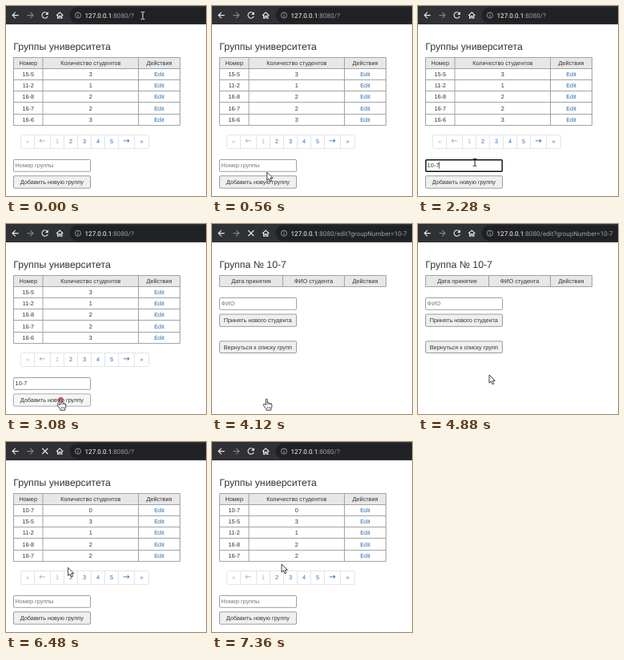
An HTML page for the animation above (7.4 s loop, 250 by 238 pixels).

```html
<!DOCTYPE html>
<html lang="ru">
<head>
<meta charset="utf-8">
<title>Группы университета</title>
<style>
  html, body { margin: 0; width: 100%; height: 100%; overflow: hidden; background: #fff; }
  svg { display: block; width: 250px; height: 238px; }
  text { font: 7.3px "Liberation Sans", Arial, sans-serif; fill: #333; text-rendering: geometricPrecision; }
  text.title { font-size: 12.3px; }
  text.url { font: 8.15px Roboto, sans-serif; fill: #9aa0a6; }
  .host { fill: #fff; }
  .mid { text-anchor: middle; }
  text.link { fill: #2f6cab; }
  text.off { fill: #aaa; }
  text.wide { font: 10px "DejaVu Sans", sans-serif; }
  text.hint { fill: #757575; }
  .icon { fill: none; stroke: #e8eaed; stroke-width: 1.1; }
  .dim { stroke: #808286; }
</style>
</head>
<body>
<svg viewBox="0 0 250 238">
  <rect width="250" height="238" fill="#fff"/>
  <g id="pages"></g>
  <rect id="focus" x="9.8" y="192.8" width="95.4" height="14.4" rx="1" fill="none" stroke="#111" stroke-width="1.4"/>
  <text id="value" x="11.6" y="202"></text>
  <rect id="caret" y="195.2" width=".7" height="8.5" fill="#111"/>

  <rect width="250" height="23" fill="#303134"/>
  <rect x="79.5" y="1.5" width="190" height="20" rx="10" fill="#202124"/>
  <path class="icon" d="M15.6 11.6H8M11.8 7.8L8 11.6L11.8 15.4"/>
  <path class="icon dim" d="M26.4 11.6H34M30.2 7.8L34 11.6L30.2 15.4"/>
  <g id="reload">
    <path class="icon" d="M51.6 9.2A3.7 3.7 0 1 0 52.2 12.7"/>
    <path d="M52.8 7.2V11H49Z" fill="#e8eaed"/>
  </g>
  <path id="stop" class="icon" d="M45.3 8L52.3 15M52.3 8L45.3 15"/>
  <path class="icon" d="M63 11.8L67.2 8L71.4 11.8M64.5 10.8V15.2H66.2V12.6H68.2V15.2H69.9V10.8"/>
  <circle cx="90" cy="11.6" r="3.6" fill="none" stroke="#9aa0a6" stroke-width=".9"/>
  <path d="M90 11V13.8M90 9.2V10.1" stroke="#9aa0a6"/>
  <text class="url" x="98.5" y="14.5"><tspan class="host">127.0.0.1</tspan><tspan id="path"></tspan></text>

  <circle id="ring" stroke="#d3202c" stroke-width="1" fill="#e03a44"/>
  <g id="cursor">
    <path id="arrow" d="M0 0V10.2L2.4 8L4.1 11.8L5.9 11L4.2 7.3H7.3Z" fill="#fff" stroke="#111" stroke-width=".8" stroke-linejoin="round"/>
    <path id="ibeam" d="M-2.3 -4.6Q-.2 -4.8 0 -3.8Q.2 -4.8 2.3 -4.6M0 -3.8V3.8M-2.3 4.6Q-.2 4.8 0 3.8Q.2 4.8 2.3 4.6" fill="none"/>
    <g id="hand" stroke="#111" stroke-width=".8" stroke-linejoin="round">
      <path d="M-1.2 5.4V-1Q-1.1 -2 -.2 -2T.8 -1V3Q1.8 2.3 2.7 3.4Q3.7 2.8 4.5 3.9Q6.3 3.6 6.3 5.4V7.8Q6.2 9.2 5.3 10.2V12.2H-.7V10.7Q-2 9.6 -4 6.4Q-4.8 5 -3.7 4.4Q-2.7 4 -1.2 6Z" fill="#fff"/>
      <path d="M.8 3V5.5M2.7 3.5V5.6M4.5 4V5.8M.8 8V10.3M2.5 8V10.3M4.2 8V10.3" fill="none" stroke-width=".55"/>
    </g>
  </g>
</svg>
<script>
const LOOP = 7400, STEP = 40;
const $ = id => document.getElementById(id);

const text = (s, x, y, cls = "") => `<text class="${cls}" x="${x}" y="${y}">${s}</text>`;
const box = (x, y, w, h, fill, stroke, more = "") =>
  `<rect x="${x}" y="${y}" width="${w}" height="${h}" fill="${fill}" stroke="${stroke}" ${more}/>`;
const button = (label, y, h) =>
  box(9.5, y, 96, h, "#efefef", "#767676", 'class="button" rx="1.3" stroke-width=".7"') +
  text(label, 57.3, y + 9.8, "mid");
const field = (hint, y) =>
  box(9.5, y, 96, 14.8, "#fff", "#767676", 'rx="1" stroke-width=".7"') +
  text(hint, 11.6, y + 9.5, "hint");

function table(cols, heads, rows) {
  const top = 64.5, rowH = 14.1;
  const line = r => Math.floor(top + rowH * r) + .5;
  const centre = i => (cols[i] + cols[i + 1]) / 2;
  const bottom = line(rows.length + 1);
  let out = box(cols[0], top, 208, rowH, "#e7e7e7", "none");
  let lines = `M9.5 ${bottom}H217.5`;
  [heads, ...rows].forEach((row, r) => {
    lines += `M9.5 ${line(r)}H217.5`;
    row.forEach((s, i) =>
      out += text(s, centre(i), top + rowH * r + 9.6, s === "Edit" ? "mid link" : "mid"));
  });
  cols.forEach(x => lines += `M${x} ${top}V${bottom}`);
  return out + `<path d="${lines}" stroke="#999" stroke-width=".9" fill="none"/>`;
}

function pager() {
  const edges = [18.5, 35.5, 55.5, 72.5, 89.5, 106.5, 123.5, 140.5, 160.5, 178.5];
  return box(18.5, 161.5, 160, 17, "#fff", "#ddd", 'rx="2" stroke-width=".8"') +
    ["«", "←", "1", "2", "3", "4", "5", "→", "»"].map((s, i) =>
      (i ? `<path d="M${edges[i]} 161.5V178.5" stroke="#ddd" stroke-width=".8"/>` : "") +
      text(s, (edges[i] + edges[i + 1]) / 2, 172.3,
        `mid ${i < 3 ? "off" : "link"} ${"←→".includes(s) ? "wide" : ""}`)).join("");
}

const groups = [["15-5", 3], ["11-2", 1], ["16-8", 2], ["16-7", 2], ["16-6", 3]];
const listPage = rows =>
  text("Группы университета", 9.3, 55, "title") +
  table([9.5, 46, 165.5, 217.5], ["Номер", "Количество студентов", "Действия"],
    rows.map(r => [...r, "Edit"])) +
  pager() + field("Номер группы", 192.5) + button("Добавить новую группу", 212.8, 15.4);

const pages = {
  before: listPage(groups),
  edit: text("Группа № 10-7", 9.3, 55, "title") +
    table([9.5, 88.5, 165.5, 217.5], ["Дата принятия", "ФИО студента", "Действия"], []) +
    field("ФИО", 92.5) + button("Принять нового студента", 113, 15.4) +
    button("Вернуться к списку групп", 146.8, 14.7),
  after: listPage([["10-7", 0], ...groups.slice(0, 4)])
};
$("pages").innerHTML = Object.entries(pages).map(([k, s]) => `<g id="${k}">${s}</g>`).join("");
const buttons = [...document.querySelectorAll(".button")];
const hint = $("before").querySelector(".hint");

// Pointer path: time, x, y
const route = [
  [0, 171, 12], [480, 82, 203], [600, 66, 209], [760, 66, 190.5], [960, 71, 195],
  [2240, 71, 195], [2600, 72, 219], [2720, 72, 219], [2880, 68.5, 221], [4120, 68.5, 221],
  [4480, 79, 215], [4840, 87, 198], [4880, 89, 189], [5120, 78, 121], [5200, 77, 120],
  [5440, 78, 157], [6400, 78, 157], [6680, 76, 158.5], [7240, 76, 158.5], [7360, 87, 153]
];
const clicks = [[760, 66, 190.5], [3040, 68.5, 220], [5640, 78, 157]];
const typing = [[1560, "1"], [1680, "10"], [1760, "10-"], [1960, "10-7"]];

const slope = (i, k) => route[i] && route[i + 1]
  ? (route[i + 1][k] - route[i][k]) / (route[i + 1][0] - route[i][0]) : 0;
// Harmonic tangents keep the path smooth and without overshoot
function tangent(i, k) {
  const a = slope(i - 1, k), b = slope(i, k);
  return a * b > 0 ? 2 * a * b / (a + b) : 0;
}
function pointer(t, k) {
  const i = route.findIndex((p, n) => n && t <= p[0]) - 1;
  if (i < 0) return route[route.length - 1][k];
  const a = route[i], b = route[i + 1], h = b[0] - a[0], u = (t - a[0]) / h;
  const v = 1 - u;
  return v * v * (1 + 2 * u) * a[k] + u * u * (3 - 2 * u) * b[k] +
    h * u * v * (v * tangent(i, k) - u * tangent(i + 1, k));
}

const pageAt = t => t < 4120 ? "before" : t < 6400 ? "edit" : "after";
const within = (t, a, b) => t >= a && t < b;
const inside = (el, x, y) => {
  const b = el.getBBox();
  return x > b.x && x < b.x + b.width && y > b.y && y < b.y + b.height;
};
const show = (id, on) => $(id).setAttribute("visibility", on ? "visible" : "hidden");

function drawPointer(t) {
  const x = pointer(t, 1), y = pointer(t, 2), page = pageAt(Math.max(0, t - STEP));
  const inputY = page === "edit" ? 92.5 : 192.5;
  let kind = "arrow";
  buttons.forEach(b => {
    const over = b.parentNode.id === page && inside(b, x, y);
    const pressed = over && clicks.some(c => within(t, c[0], c[0] + 120));
    if (over) kind = "hand";
    b.setAttribute("fill", pressed ? "#f5f5f5" : over ? "#e5e5e5" : "#efefef");
    b.setAttribute("stroke", pressed ? "#8d8d8d" : over ? "#4f4f4f" : "#767676");
  });
  if (y < 23 || (x > 9 && x < 106 && y > inputY - 3 && y < inputY + 15)) kind = "ibeam";
  ["arrow", "ibeam", "hand"].forEach(k => show(k, k === kind));
  $("ibeam").setAttribute("stroke", y < 23 ? "#eee" : "#111");
  $("cursor").setAttribute("transform", `translate(${x} ${y})`);
}

function drawRing(t) {
  const life = 340, c = clicks.find(c => within(t, c[0], c[0] + life));
  show("ring", c);
  if (!c) return;
  const age = (t - c[0]) / life, alpha = 1 - age, ring = $("ring");
  ring.setAttribute("cx", c[1]);
  ring.setAttribute("cy", c[2]);
  ring.setAttribute("r", 1.7 + 9.3 * age);
  ring.setAttribute("stroke-opacity", alpha);
  ring.setAttribute("fill-opacity", alpha * Math.max(0, .8 - 1.3 * age));
}

function drawField(t) {
  const typed = typing.filter(k => t >= k[0]).pop();
  const value = typed && t < 4120 ? typed[1] : "";
  const focused = within(t, 760, 3040);
  const since = t - (typed ? typed[0] : 760);
  $("value").textContent = value;
  hint.setAttribute("visibility", value ? "hidden" : "inherit");
  show("focus", focused);
  show("caret", focused && since % 880 < 480);
  $("caret").setAttribute("x", 11.3 + (value ? $("value").getComputedTextLength() : 0));
}

function draw(t) {
  for (const k in pages) show(k, k === pageAt(t));
  const loading = within(t, 3120, 4640) || within(t, 5960, 6920);
  show("stop", loading);
  show("reload", !loading);
  $("path").textContent = ":8080/" + (within(t, 3160, 6000) ? "edit?groupNumber=10-7" : "?");
  drawField(t);
  drawRing(t);
  drawPointer(t);
}

const start = performance.now();
function tick() {
  const t = (performance.now() - start + 1) % LOOP;
  draw(t - t % STEP);
  requestAnimationFrame(tick);
}
tick();
</script>
</body>
</html>
```
